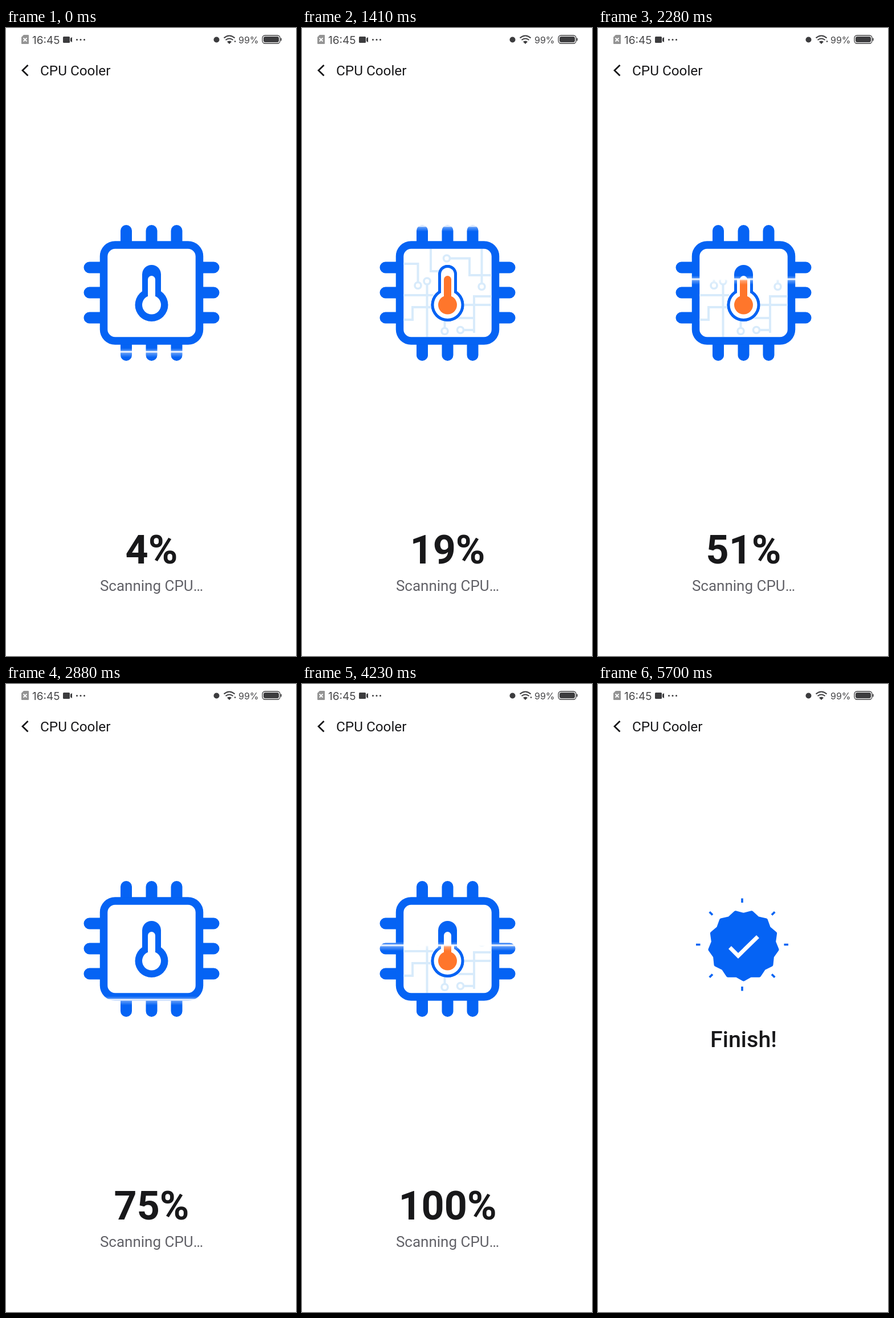
Recreate the animation shown at these times as an HTML page. Size 509x1100 px, loop 5.73 s.

```html
<!DOCTYPE html>
<html lang="en">
<head>
<meta charset="utf-8">
<title>CPU Cooler</title>
<style>
  html, body { margin: 0; width: 100%; height: 100%; overflow: hidden; background: #fff; }
  svg { display: block; width: 100vw; height: 100vh; font-family: Roboto, sans-serif; }
  .line { fill: none; stroke: #0563f4; }
  .status { font-family: Inter, sans-serif; fill: #48484a; }
  .mid { text-anchor: middle; }
</style>
</head>
<body>
<svg viewBox="0 0 509 1100">
  <defs>
    <clipPath id="below"><rect id="reveal" x="130" width="250" height="300"/></clipPath>
    <clipPath id="inside"><rect x="178" y="387" width="155" height="154" rx="15"/></clipPath>
    <linearGradient id="glow" x2="0" y2="1">
      <stop offset="0" stop-color="#fff" stop-opacity="0"/>
      <stop offset=".27" stop-color="#fff" stop-opacity=".3"/>
      <stop offset=".34" stop-color="#fff" stop-opacity=".95"/>
      <stop offset=".46" stop-color="#fff" stop-opacity=".85"/>
      <stop offset=".54" stop-color="#fff" stop-opacity=".35"/>
      <stop offset="1" stop-color="#fff" stop-opacity="0"/>
    </linearGradient>
  </defs>

  <!-- status bar -->
  <path d="M31 12h8q1 0 1 1v14q0 1-1 1H28q-1 0-1-1V16z" fill="#949494"/>
  <path d="M30.5 17.5l6 6m0-6l-6 6" stroke="#fff" stroke-width="1.8"/>
  <text class="status" x="46" y="27.5" font-size="19">16:45</text>
  <g fill="#3c3c3e">
    <rect x="100" y="15" width="12" height="11" rx="1.5"/>
    <path d="M113 18l3-2v9l-3-2z"/>
    <circle cx="124.5" cy="20.5" r="1.5"/><circle cx="131" cy="20.5" r="1.5"/><circle cx="137.5" cy="20.5" r="1.5"/>
    <circle cx="369.5" cy="20.5" r="5"/>
    <path d="M388 24q4-3 8 0l-4 4z"/>
    <path d="M382.5 17.5q9.500-8 19 0M385.500 21q6.500-5 13 0" fill="none" stroke="#3c3c3e" stroke-width="2"/>
    <circle id="traffic" cx="402" cy="23.500" r="1.300"/>
    <rect x="452" y="15" width="27" height="10" rx="3"/>
    <rect x="450" y="13" width="31" height="14" rx="4.500" fill="none" stroke="#3c3c3e" stroke-width="1.300"/>
    <rect x="482" y="17.500" width="1.600" height="5" rx=".8"/>
  </g>
  <text class="status" x="408" y="26.500" font-size="16">99%</text>

  <path d="M38.500 65l-9.500 9.300 9.500 9.300" fill="none" stroke="#18181a" stroke-width="2.800"/>
  <text x="60" y="83" font-size="24.300" fill="#18181a">CPU Cooler</text>

  <g id="scan">
    <path class="line" stroke-width="20" stroke-linecap="round"
      d="M211 355V573M255.500 355V573M299.500 355V573M146.500 419.500H364.500M146.500 463.500H364.500M146.500 507.500H364.500"/>
    <rect class="line" x="171.500" y="380" width="168" height="168" rx="20" stroke-width="13.500" style="fill:#fff"/>
    <g id="plain"></g>
    <g clip-path="url(#below)">
      <g clip-path="url(#inside)" fill="none" stroke="#d8ebfb" stroke-width="4">
        <path d="M178 413H203.500V445M219.500 449V541M178 468H230M178 511H194V489H228M226 387V426H240
          M260 403.500H294V433H333M315.500 387V447M333 470H302V534M284 529H302M282 485H333M274 508H302M250.500 512V525"/>
        <g id="nodes" stroke-width="3.600"></g>
      </g>
      <g id="hot"></g>
    </g>
    <rect id="beam" x="130" width="250" height="16" fill="url(#glow)"/>
    <text id="percent" class="mid" x="255.500" y="938" font-size="70" font-weight="700" fill="#18181a"></text>
    <text class="mid" x="255.500" y="986" font-size="26" fill="#626268">Scanning CPU…</text>
  </g>

  <g id="done">
    <circle id="ring" class="line" cx="256" cy="456" r="57" stroke-width="6" pathLength="360" transform="rotate(-88 256 456)"/>
    <path id="badge" fill="#0563f4" stroke="#0563f4" stroke-width="6" stroke-linejoin="round"/>
    <path id="check" d="M231.500 461.500L246 476L280.500 442.500" pathLength="100" fill="none" stroke="#fff" stroke-width="7"/>
    <path id="rays" class="line" stroke-width="3.600"/>
    <text class="mid" x="255.500" y="636" font-size="39.500" font-weight="500" fill="#18181a">Finish!</text>
  </g>
</svg>
<script>
const LOOP = 5730, SWEEP = 1800, SCAN_END = 4530;
const $ = id => document.getElementById(id);
const set = (id, attrs) => Object.entries(attrs).forEach(([k, v]) => $(id).setAttribute(k, v));
const show = (id, on) => set(id, { visibility: on ? 'inherit' : 'hidden' });
const progress = (t, from, to) => Math.min(1, Math.max(0, (t - from) / (to - from)));
const easeOut = p => 1 - (1 - p) ** 3;
const polar = (cx, cy, r, a) => `${cx + r * Math.cos(a)} ${cy + r * Math.sin(a)}`;

const thermometer = (color, width, radius, top) =>
  `<path d="M255.500 ${top}V485" stroke="${color}" stroke-width="${width}" stroke-linecap="round"/>
   <circle cx="255.500" cy="485" r="${radius}" fill="${color}"/>`;
const body = thermometer('#0563f4', 33, 29, 431.5);
$('plain').innerHTML = body + thermometer('#fff', 13, 16.5, 440.5);
$('hot').innerHTML = body + thermometer('#fff', 23, 24, 431.5) + thermometer('#ff762b', 13, 16.5, 440.5);

$('nodes').innerHTML = [[203.5, 451], [219.5, 443.5], [254, 403.5], [315.5, 453], [278, 529], [250.5, 531]]
  .map(([x, y]) => `<circle cx="${x}" cy="${y}" r="5.500"/>`).join('');

const corners = Array.from({ length: 26 }, (_, i) =>
  polar(255.5, 458, i % 2 ? 54 : 59.5, Math.PI / 2 + i * Math.PI / 13));
set('badge', { d: `M${corners.join('L')}Z` });

function drawScan(t) {
  const y = 464 + 119 * Math.cos(Math.PI * (t + 301) / SWEEP);
  set('reveal', { y });
  set('beam', { y: y - 6 });
  const value = t < 1500 ? 4.2 + t * 0.0106 : 20.1 + (t - 1500) * 0.04;
  $('percent').textContent = Math.min(100, Math.floor(value)) + '%';
}

function drawDone(t) {
  const sweep = 360 * progress(t, 4590, 4928);
  set('ring', { 'stroke-dasharray': `${sweep} 400` });
  show('ring', sweep > 0 && t < 5250);

  const size = easeOut(progress(t, 4960, 5220));
  set('badge', { transform: `translate(255.500 458) scale(${size}) translate(-255.500 -458)` });
  show('badge', size > 0);

  const tick = 100 * easeOut(progress(t, 5130, 5400));
  set('check', { 'stroke-dasharray': `${tick} 200` });
  show('check', tick > 0);

  const burst = easeOut(progress(t, 5350, 5650));
  const inner = 60 + 13.5 * burst, outer = inner + 7.5;
  const rays = Array.from({ length: 8 }, (_, i) => {
    const a = i * Math.PI / 4;
    return `M${polar(253, 456.5, inner, a)}L${polar(253, 456.5, outer, a)}`;
  });
  set('rays', { d: rays.join('') });
  show('rays', burst > 0);
}

function frame(now) {
  const t = now % LOOP;
  const scanning = t < SCAN_END;
  show('scan', scanning);
  show('done', !scanning);
  show('traffic', t < 900 || (t > 1800 && t < 4700));
  scanning ? drawScan(t) : drawDone(t);
  requestAnimationFrame(frame);
}
frame(performance.now());
</script>
</body>
</html>
```
